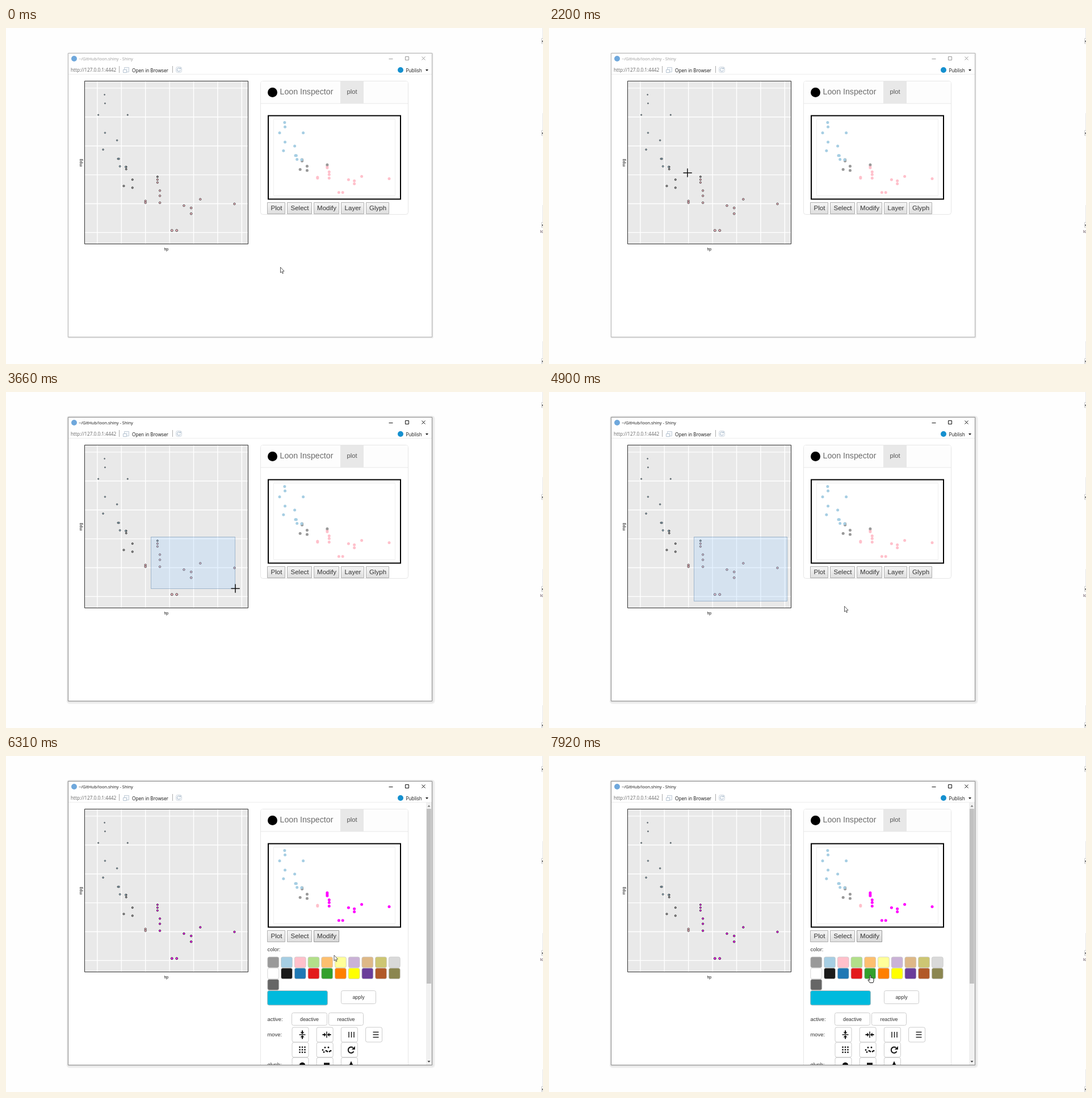
These frames come from a looping animation (946 by 592 pixels, 8000 ms). An HTML page with a canvas:

```html
<!DOCTYPE html>
<html lang="en">
<head>
<meta charset="utf-8">
<title>Linked scatterplot inspector</title>
<style>
html, body { margin: 0; width: 100%; height: 100%; overflow: hidden; background: #fff; }
canvas { display: block; width: 946px; height: 592px; }
</style>
</head>
<body>
<canvas id="stage" width="946" height="592"></canvas>
<script>
const ctx = document.getElementById('stage').getContext('2d');
const UI = '"Open Sans", "Noto Sans", sans-serif';
const ARIAL = '"Liberation Sans", Arial, sans-serif';
const INK = '#111';
const LOOP = 8000, STEP = 134;
const ACTIVATE = 2870, SELECT = 5170, OPEN = 6150;

// mtcars by cylinder count, as hp: mpg values
const cars = {
  '#ffc0cb': { 150: [15.5, 15.2], 175: [18.7, 19.2], 180: [16.4, 17.3, 15.2], 205: [10.4], 215: [10.4],
    230: [14.7], 245: [14.3, 13.3], 264: [15.8], 335: [15] },
  '#999999': { 105: [18.1], 110: [21, 21.4], 123: [19.2, 17.8], 175: [19.7] },
  '#a6cee3': { 52: [30.4], 62: [24.4], 65: [33.9], 66: [32.4, 27.3], 91: [26], 93: [22.8], 95: [22.8],
    97: [21.5], 109: [21.4], 113: [30.4] }
};

const swatches = ('999999 a6cee3 ffc0cb b2df8a fdbf6f ffff99 cab2d6 deb887 cdc673 d9d9d9 ' +
  'ffffff 1a1a1a 1f78b4 e31a1c 33a02c ff7f00 ffff00 6a3d9a b15928 8b8650 666666').split(' ');

// Pointer moves: start, end, x, y to reach
const moves = [
  [0, 1, 483, 421], [370, 800, 496, 370], [800, 1200, 479, 323], [1360, 1640, 235, 230],
  [1790, 2200, 244, 255], [2200, 2560, 255, 255], [2870, 3660, 404, 346], [3660, 3940, 420, 368],
  [3940, 4340, 655, 190], [4340, 4600, 611, 107], [4770, 4900, 520, 377], [4900, 5710, 583, 326],
  [5860, 6690, 572, 375], [6690, 6970, 569, 387], [7120, 7520, 571, 422], [7520, 7920, 566, 386]
];

function pointerAt(t) {
  let [, , x, y] = moves[0];
  for (const [start, end, tx, ty] of moves) {
    if (t < start) break;
    const n = Math.max(1, Math.round((end - start) / STEP));
    const k = Math.min(1, Math.floor((t - start) / (end - start) * n) / n);
    x += (tx - x) * k;
    y += (ty - y) * k;
  }
  return { x, y };
}

const inside = (p, x, y, w, h) => p.x >= x && p.x < x + w && p.y >= y && p.y < y + h;

function cursorKind(p, open) {
  if (inside(p, 138, 93, 289, 288)) return 'cross';
  if (inside(p, 589, 94, 41, 39)) return 'hand';
  if (open && inside(p, 460, 354, 235, 39)) return (p.y - 354) % 19.7 < 2 ? 'move' : 'hand';
  return 'arrow';
}

function paint(fill, stroke, lw = 1) {
  if (fill) { ctx.fillStyle = fill; ctx.fill(); }
  if (stroke) { ctx.strokeStyle = stroke; ctx.lineWidth = lw; ctx.stroke(); }
}

function box(x, y, w, h, fill, stroke, r = 0, lw) {
  ctx.beginPath();
  ctx.roundRect(x, y, w, h, r);
  paint(fill, stroke, lw);
}

function arc(x, y, r, fill, stroke, lw, from = 0, to = 7) {
  ctx.beginPath();
  ctx.arc(x, y, r, from, to);
  paint(fill, stroke, lw);
}

function line(color, lw, ...pts) {
  ctx.beginPath();
  pts.forEach(p => ctx.lineTo(...p));
  paint(null, color, lw);
}

function poly(pts, fill, stroke, lw) {
  ctx.beginPath();
  pts.forEach(p => ctx.lineTo(...p));
  ctx.closePath();
  paint(fill, stroke, lw);
}

function text(str, x, y, size, color, font = ARIAL, align = 'left') {
  ctx.font = `${size}px ${font}`;
  ctx.fillStyle = color;
  ctx.textAlign = align;
  ctx.fillText(str, x, y);
}

function at(x, y, angle, draw) {
  ctx.save();
  ctx.translate(x, y);
  ctx.rotate(angle);
  draw();
  ctx.restore();
}

function drawDesktop() {
  box(0, 0, 946, 592, '#fefefe');
  [28, 190, 352, 592].forEach(y => {
    line('#e8e8e8', 1, [945.5, y - 40], [945.5, y - 10]);
    box(943.5, y - 9.5, 8, 9, '#f6f6f6', '#d0d0d0');
    box(944.5, y - 6, 2, 3, '#666');
  });
  text('lo', 941, 361, 7.5, '#301828', UI);
}

function drawWindow(active) {
  const spread = active ? 6 : 3;
  for (let d = spread; d > 0; d--) {
    const v = 250 - (spread - d + 1) * (active ? 5 : 10);
    box(110 - d * 0.6, 45 - d * 0.6, 640 + d * 1.6, 499 + d * 1.6, `rgb(${v},${v},${v})`, null, d);
  }
  box(109.5, 44.5, 641, 500, '#fff', active ? '#8a8a8a' : '#b4b4b4');
  const ink = active ? INK : '#999';
  arc(120, 54, 5, '#6fa8dc');
  text('~/GitHub/loon.shiny - Shiny', 128, 57, 7.5, ink, UI);
  line(ink, 1, [674.5, 54.5], [681.5, 54.5]);
  box(703.5, 50.5, 6, 6, null, ink);
  line(ink, 1, [732.5, 50.5], [738.5, 56.5]);
  line(ink, 1, [738.5, 50.5], [732.5, 56.5]);

  line('#eee', 1, [110, 81.5], [750, 81.5]);
  text('http://127.0.0.1:4442', 114, 77, 8.25, '#666', UI);
  [199.5, 293.5].forEach(x => line('#aaa', 1, [x, 67], [x, 79]));
  box(208.5, 69.5, 8, 8, '#f4f7fa', '#c4ced8');
  box(206.5, 73.5, 6, 5, '#fff', '#b4c2d0');
  text('Open in Browser', 222, 77.5, 8.2, INK, UI);
  box(299.5, 68.5, 10, 10, '#f8fafc', '#d0d8e0', 3);
  arc(304.5, 73.5, 3, null, '#b8c6d4', 1.1, 0.3, 5.4);
  poly([[305, 72], [308.5, 72.5], [308, 69]], '#b8c6d4');
  arc(695, 74, 5, '#1590cf');
  text('Publish', 704.5, 77.5, 8.3, INK, UI);
  poly([[739, 73], [744, 73], [741.5, 76]], INK);
}

function eachCar(picked, draw) {
  for (const [color, byPower] of Object.entries(cars))
    for (const [hp, values] of Object.entries(byPower))
      values.forEach(mpg => draw(+hp, mpg, picked && hp >= 175 ? '#ff00ff' : color));
}

function drawScatter(picked) {
  box(138.5, 93.5, 288, 287, '#e9e9e9');
  for (let i = 0; i < 7; i++) {
    const x = 160.9 + 42.4 * i, y = 105.9 + 50.9 * i;
    line('#fff', 1.4, [x, 94], [x, 380]);
    if (y < 380) line('#fff', 1.4, [139, y], [426, y]);
  }
  // Marker size follows weight, which falls with mileage
  eachCar(picked, (hp, mpg, color) =>
    arc(160.9 + (hp - 50) * 0.8476, 360.8 - (mpg - 10) * 10.18, 2.4 - 0.045 * mpg, color, '#222', 0.8));
  box(138.5, 93.5, 288, 287, null, '#333');
  text('hp', 282.3, 392, 7, INK, ARIAL, 'center');
  at(133.5, 237.5, -Math.PI / 2, () => text('mpg', 0, 0, 7, INK, ARIAL, 'center'));
}

function drawBrush(x, y) {
  ctx.save();
  ctx.globalAlpha = 0.25;
  box(255, 255, x - 255, y - 255, '#99ccff');
  box(255.5, 255.5, x - 256, y - 256, null, '#003366');
  ctx.restore();
}

function tabButton(label, x, w, lit) {
  const g = ctx.createLinearGradient(0, 307, 0, 328);
  g.addColorStop(0, lit ? '#f0f0f0' : '#f6f6f6');
  g.addColorStop(1, lit ? '#d6d6d6' : '#ddd');
  box(x + 0.5, 307.5, w - 1, 20, g, lit ? '#999' : '#b0b0b0');
  text(label, x + w / 2 + 0.5, 321, 11.5, '#333', ARIAL, 'center');
}

function drawInspector(picked, open, p) {
  box(448.5, 93.5, 260, open ? 480 : 235, '#fff', '#e6e6e6', 4);
  box(449, 94, 259, 39, '#fdfdfd', null, 3);
  line('#e7e7e7', 1, [449, 133], [708, 133]);
  box(589, 94, 41, 39, '#e8e8e8');
  arc(469.5, 113.5, 8.5, '#000');
  text('Loon Inspector', 482.5, 117.3, 14.2, '#6c6c6c');
  text('plot', 600.5, 116, 11.2, '#555');

  box(462, 154.5, 233, 147, '#fff', '#000', 0, 2);
  box(471.5, 160.5, 214, 135, null, '#eee');
  eachCar(picked, (hp, mpg, color) =>
    arc(482 + (hp - 52) * 0.682, 166.5 + (33.9 - mpg) * 5.243, 2.5, color));

  tabButton('Plot', 460, 32, inside(p, 460, 307, 32, 21));
  tabButton('Select', 495, 44);
  tabButton('Modify', 542, 45, open);
  if (open) {
    drawModify();
  } else {
    tabButton('Layer', 590, 41);
    tabButton('Glyph', 634, 41);
  }
}

function pushButton(x, y, w, h, label = '') {
  box(x + 0.5, y + 0.5, w - 1, h - 1, '#fff', '#ccc', 3);
  text(label, x + w / 2, y + h / 2 + 3, 8.9, '#333', ARIAL, 'center');
}

function squeezeIcon() {
  line(INK, 1.4, [-5.5, 0], [5.5, 0]);
  [-1, 1].forEach(s => {
    line(INK, 2, [0, 7.5 * s], [0, 3 * s]);
    poly([[-3.5, 4.6 * s], [3.5, 4.6 * s], [0, s]], INK);
  });
}

function barsIcon() {
  [-4.5, 0, 4.5].forEach(x => line(INK, 1.4, [x, -5], [x, 5]));
}

function gridIcon() {
  for (let i = 0; i < 9; i++) box((i % 3) * 4.5 - 5.7, Math.floor(i / 3) * 4.5 - 5.7, 2.4, 2.4, INK);
}

function jitterIcon() {
  for (let i = 0; i < 8; i++) arc(i * 2 - 7, 4.5 * Math.sin(i * 2.2), 1.4, INK);
}

function resetIcon() {
  arc(0, 0, 5.2, null, INK, 2, 0.5, 5.4);
  poly([[0.8, -0.8], [6.8, -0.8], [6.8, -6.8]], INK);
}

function drawModify() {
  const labels = { 'color:': 344, 'active:': 467, 'move:': 494, 'glyph:': 547 };
  for (const [label, y] of Object.entries(labels)) text(label, 460.5, y, 9.4, '#333');
  swatches.forEach((c, i) =>
    box(460.8 + (i % 10) * 23.72, 354 + Math.floor(i / 10) * 19.7, 20, 19, '#' + c, '#ccc', 3, 0.8));
  box(460.5, 413.5, 106, 25.5, '#00badd', '#bbb', 3);
  pushButton(590, 413, 62, 24, 'apply');
  pushButton(503, 452, 63, 23, 'deactive');
  pushButton(568, 452, 62, 23, 'reactive');

  for (let i = 0; i < 12; i++) {
    const row = Math.floor(i / 4), col = i % 4;
    if (row === 0 || col < 3) pushButton(503.5 + col * 43.2, 477.5 + row * 26.7, 30, 27);
  }
  const turn = Math.PI / 2;
  at(522, 491, 0, squeezeIcon);
  at(565, 491, turn, squeezeIcon);
  at(608.5, 491, 0, barsIcon);
  at(651.5, 491, turn, barsIcon);
  at(522, 517.5, 0, gridIcon);
  at(565, 518, 0, jitterIcon);
  at(608, 518, 0, resetIcon);
  arc(522, 545, 5.2, INK);
  box(560, 540.5, 10, 10, INK);
  poly([[608, 537.5], [613.5, 549], [602.5, 549]], INK);

  box(740, 82, 10, 462, '#f1f1f1');
  box(741, 93, 8, 308, '#c1c1c1');
  poly([[742.5, 89.5], [747.5, 89.5], [745, 86.5]], '#777');
  poly([[742.5, 537], [747.5, 537], [745, 540]], '#444');
}

const cursors = {
  arrow() {
    poly([[0.5, 0.5], [0.5, 10.2], [2.6, 8.2], [4, 11.6], [5.5, 11], [4.2, 7.7], [7, 7.4]], '#fff', '#333', 0.8);
  },
  cross() {
    line(INK, 1.5, [-7.5, 0.3], [7.8, 0.3]);
    line(INK, 1.5, [0, -7.5], [0, 7.8]);
  },
  hand() {
    poly([[-1, 1], [0, 0.3], [1, 1], [1, 5], [2.5, 4.8], [4.5, 5.4], [6, 6.4], [6, 10], [4.8, 13.5],
      [-0.8, 13.5], [-4, 9], [-3.4, 7.8], [-1, 9.2]], '#fff', '#222');
  },
  move() {
    const arm = [[-1, -1], [-1, -4], [-3, -4], [0, -7], [3, -4], [1, -4]];
    const turned = [[1, 0], [0, 1], [-1, 0], [0, -1]].flatMap(([c, s]) =>
      arm.map(([x, y]) => [x * c - y * s, x * s + y * c]));
    poly(turned, '#fff', INK);
  }
};

function render(t) {
  const p = pointerAt(t), picked = t >= SELECT, open = t >= OPEN;
  drawDesktop();
  drawWindow(t >= ACTIVATE);
  ctx.save();
  ctx.beginPath();
  ctx.rect(110, 82, 640, 462);
  ctx.clip();
  drawScatter(picked);
  drawInspector(picked, open, p);
  if (t >= ACTIVATE + STEP && !picked) {
    const end = pointerAt(Math.min(t, 3940));
    drawBrush(end.x, end.y + 1);
  }
  ctx.restore();
  at(p.x, p.y, 0, cursors[cursorKind(p, open)]);
}

function tick() {
  render(performance.now() % LOOP);
  requestAnimationFrame(tick);
}
tick();
</script>
</body>
</html>
```
